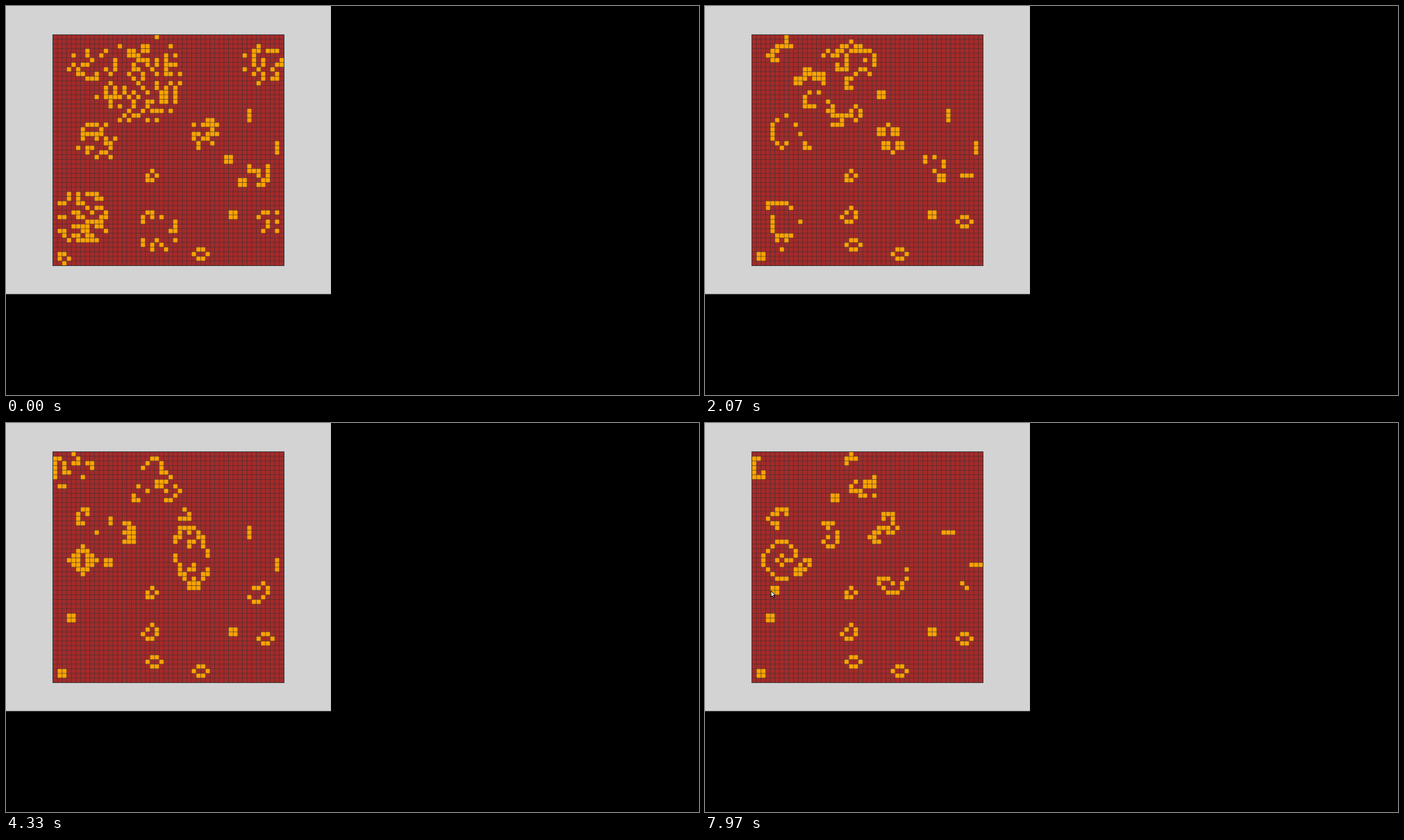
Recreate the animation shown at these times as an HTML page with a canvas. Size 998x561 px, loop 8000 ms.

```html
<!DOCTYPE html>
<html lang="en">
<head>
<meta charset="utf-8">
<title>Game of Life</title>
<style>
  html, body { margin: 0; width: 100%; height: 100%; overflow: hidden; background: #000; }
  canvas { display: block; }
</style>
</head>
<body>
<canvas width="998" height="561"></canvas>
<script>
const ctx = document.querySelector("canvas").getContext("2d");
const N = 50, LEFT = 67.4, TOP = 41.4, PITCH = 6.66, LOOP = 8000;
const FIRST_TICK = 130, TICK = 200, LAST_GEN = 25;

// Patches of random cells: column, row, radius
const patches = [[18, 9, 10], [45, 6, 5], [6, 6, 4], [9, 23, 5], [32, 21, 4],
                 [44, 30, 3], [6, 39, 6], [22, 42, 5], [46, 40, 3]];
const DENSITY = 0.36;

// Well-known small figures and where each stands
const figures = [
  ["oo/oo", [[40, 31], [38, 38], [37, 26]]],
  [".o./o.o/oo.", [[20, 29]]],
  ["oo./o.o/.o.", [[1, 47]]],
  ["o/o/o", [[42, 16], [48, 23]]],
  [".oo./o..o/.oo.", [[30, 46]]]
];

let seed = 7;
function random() {
  seed = (Math.imul(seed, 1664525) + 1013904223) >>> 0;
  return seed / 2 ** 32;
}

function firstBoard() {
  const board = new Uint8Array(N * N).map((_, i) => {
    const x = i % N, y = Math.floor(i / N);
    const inside = patches.some(([cx, cy, r]) => Math.hypot(x - cx, y - cy) < r);
    return random() < DENSITY && inside ? 1 : 0;
  });
  for (const [shape, places] of figures)
    for (const [x, y] of places)
      shape.split("/").forEach((row, dy) => [...row].forEach((c, dx) => {
        board[(y + dy) * N + x + dx] = c === "o" ? 1 : 0;
      }));
  return board;
}

function nextGeneration(board) {
  const alive = (x, y) => x >= 0 && y >= 0 && x < N && y < N ? board[y * N + x] : 0;
  return board.map((cell, i) => {
    const x = i % N, y = Math.floor(i / N);
    let count = -cell;
    for (let dy = -1; dy <= 1; dy++)
      for (let dx = -1; dx <= 1; dx++) count += alive(x + dx, y + dy);
    return count === 3 || (cell && count === 2) ? 1 : 0;
  });
}

const boards = [firstBoard()];
while (boards.length <= LAST_GEN) boards.push(nextGeneration(boards[boards.length - 1]));

// Pointer path over the paused board: time, x, y
const path = [[5500, 262, 408], [5700, 263, 357], [6000, 263, 357], [7300, 95, 242]];
const arrow = new Path2D("M0 0V9L2 7L3.6 10.4L5 9.8L3.5 6.5H6Z");

function drawPointer(t) {
  if (t < path[0][0]) return;
  let i = 0;
  while (i < path.length - 2 && t > path[i + 1][0]) i++;
  const [t0, x0, y0] = path[i], [t1, x1, y1] = path[i + 1];
  const k = Math.min(1, (t - t0) / (t1 - t0)), ease = k * k * (3 - 2 * k);
  ctx.save();
  ctx.translate(x0 + (x1 - x0) * ease, y0 + (y1 - y0) * ease);
  ctx.fillStyle = "#fff";
  ctx.strokeStyle = "#000";
  ctx.lineWidth = 1;
  ctx.fill(arrow);
  ctx.stroke(arrow);
  ctx.restore();
}

function drawGrid() {
  const size = N * PITCH;
  ctx.beginPath();
  for (let i = 0; i <= N; i++) {
    const d = i * PITCH;
    ctx.moveTo(LEFT + d, TOP);
    ctx.lineTo(LEFT + d, TOP + size);
    ctx.moveTo(LEFT, TOP + d);
    ctx.lineTo(LEFT + size, TOP + d);
  }
  ctx.strokeStyle = "#333";
  ctx.lineWidth = 0.55;
  ctx.stroke();
  ctx.lineWidth = 0.8;
  ctx.strokeRect(LEFT, TOP, size, size);
}

function drawCell(x, y, size = 1) {
  ctx.fillRect(LEFT + x * PITCH, TOP + y * PITCH, size * PITCH, size * PITCH);
}

function draw(t) {
  const gen = Math.min(LAST_GEN, Math.max(0, Math.floor((t - FIRST_TICK) / TICK) + 1));
  ctx.fillStyle = "#000";
  ctx.fillRect(0, 0, 998, 561);
  ctx.fillStyle = "#d3d3d3";
  ctx.fillRect(0, 0, 468, 415.5);
  ctx.fillStyle = "#a52a2a";
  drawCell(0, 0, N);
  ctx.fillStyle = "#ffa500";
  boards[gen].forEach((cell, i) => { if (cell) drawCell(i % N, Math.floor(i / N)); });
  if (t > 7330) drawCell(4, 29, 2); // clicked under the pointer
  drawGrid();
  drawPointer(t);
}

const start = performance.now();
function frame() {
  draw((performance.now() - start) % LOOP);
  requestAnimationFrame(frame);
}
frame();
</script>
</body>
</html>
```
